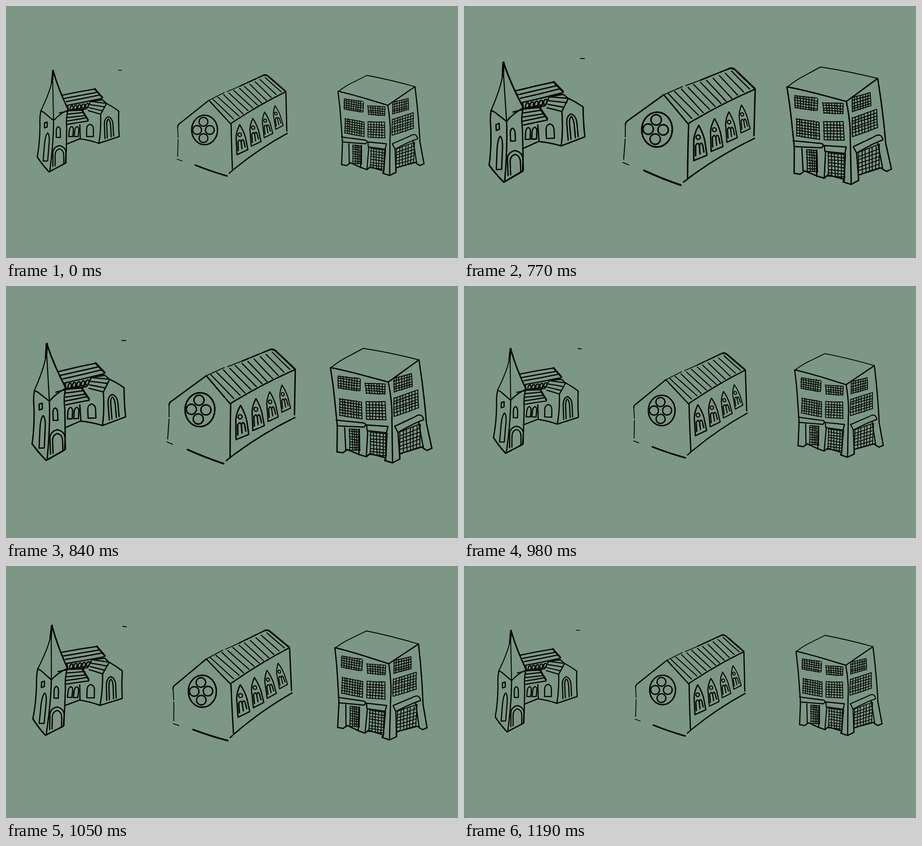
These frames come from a looping animation (998x556 px, 7140 ms). An HTML page:

```html
<!DOCTYPE html>
<html lang="en">
<head>
<meta charset="utf-8">
<title>Three sketched buildings</title>
<style>
html, body { margin: 0; width: 100%; height: 100%; overflow: hidden; background: #2c352f; }
svg { display: block; width: 998px; height: 556px; background: #7c9785; border-radius: 3px; }
path { fill: none; stroke: #000; stroke-linecap: round; stroke-linejoin: round; }
</style>
</head>
<body>
<svg viewBox="0 0 998 556"></svg>
<script>
const LOOP = 7140, START = 700, STEP = 70, STEPS = 7;
const { cos, sin, PI, exp, abs, floor, round } = Math;
const svg = document.querySelector('svg');

function add(parent, tag, attrs = {}) {
  const el = document.createElementNS(svg.namespaceURI, tag);
  for (const key in attrs) el.setAttribute(key, attrs[key]);
  parent.append(el);
  return el;
}
const building = (x, y, turn) => ({ x, y, turn, el: add(svg, 'g') });
const church = building(164, 260, -13.5);
const chapel = building(502, 258, 15.5);
const office = building(827, 262, -10.5);

let seed = 7;
function jitter(size) {
  seed = seed * 16807 % 2147483647;
  return (seed / 2147483647 * 2 - 1) * size;
}
const mix = (a, b, t) => a.map((v, i) => v + (b[i] - v) * t);
const shake = (p, size) => p.map(v => (v + jitter(size)).toFixed(1));

const pen = ({ el }, width, ...strokes) =>
  add(el, 'path', { d: strokes.join(''), 'stroke-width': width });

// Evenly spaced hand-drawn lines, from the edge a-b across to the edge c-d.
function ruled(target, width, count, a, b, c, d, wobble = .8) {
  for (let i = 0; i <= count; i++) {
    const from = mix(a, b, i / count), to = mix(c, d, i / count);
    pen(target, width, `M${shake(from, wobble)}Q${shake(mix(from, to, .5), wobble)} ${shake(to, wobble)}`);
  }
}

// Pointed opening: x is the middle of the base, y its level.
function arch(target, x, y, w, h, { lean = 0, slope = 0, open = false } = {}) {
  const side = s => `${x + s * w / 2 + lean * .6} ${y - h * .6}`;
  const shoulder = s => `${x + s * w / 2 + lean} ${y - h * .92}`;
  const foot = s => `${x + s * w / 2} ${y + s * slope * w / 2}`;
  pen(target, 2.4, `M${foot(-1)}L${side(-1)}Q${shoulder(-1)} ${x + lean} ${y - h}`,
    `Q${shoulder(1)} ${side(1)}L${foot(1)}`, open ? '' : 'Z');
}

function oval(target, width, x, y, rx, ry = rx) {
  pen(target, width, `M${x - rx} ${y}a${rx} ${ry} 0 1 1 ${2 * rx} 0a${rx} ${ry} 0 1 1 ${-2 * rx} 0`);
}

function glazing(x, y, w, h, slope, cell) {
  const corners = [[x, y], [x + w, y + slope * w], [x, y + h], [x + w, y + h + slope * w]];
  const [a, b, c, d] = corners.map(p => shake(p, 1).map(Number));
  ruled(office, 1.7, round(w / cell), a, b, c, d, 1);
  ruled(office, 1.7, round(h / cell), a, c, b, d, 1);
}

// Church: spire and tower
pen(church, 4.4, 'M104 143L101.500 168');
pen(church, 2, 'M101 168Q96 192 77 231', 'M103 162L105 253');
pen(church, 3, 'M105 146Q116 184 137 228', 'M69 333Q80 350 95 366L131 347');
pen(church, 2.5, 'M77 231L84 235L105 253Q116 240 137 229', 'M118 236L136 232',
  'M77 231Q74 245 75 262Q75 300 69 333', 'M105 253Q105 300 97 362',
  'M137 230Q132 245 134 270L133 320L131 347', 'M85 258L91 256V267L85 269Z');
arch(church, 87, 342, 10, 62, { lean: 5 });
arch(church, 115.5, 290, 9, 24);
for (const size of [1, .66])
  arch(church, 118, 350, 29 * size, 42 * (size + 1) / 2, { slope: -.3, open: true });

// Church: roofs, nave and wing
ruled(church, 2.5, 3, [125, 196], [136, 219], [197, 183], [212, 204]);
ruled(church, 2.4, 4, [137, 231], [134, 262], [170, 229], [181, 253]);
ruled(church, 2.3, 3, [188, 211], [181, 231], [222, 215], [209, 239]);
pen(church, 3.6, 'M196 183L213 202', 'M169 232L181 251');
pen(church, 2.5, 'M136 219L138 231L178 227L187 210L213 207L222 215Q234 221 249 232Q248 262 250 288L205 303',
  'M222 215L209 239Q210 275 205 303Q185 296 163 293L133 305', 'M163 262L164 293');
for (let i = 0; i < 5; i++) arch(church, 144 + 8.5 * i, 229 - 1.3 * i, 6, 9, { lean: 2 });
for (const x of [143, 155]) arch(church, x, 288, 9, 22, { lean: 2 });
arch(church, 185.5, 288, 15, 27);
for (const size of [1, .45])
  arch(church, 228, 290, 19 * size, 46 * (size + 4) / 5, { lean: -2, slope: -.3, open: true });
pen(church, 1.7, 'M248 141.500L255.500 142');

// Chapel: walls and roof
pen(chapel, 1.7, 'M379 268L380 290', 'M380 294L379 332', 'M378 338L389 342', 'M448 208L482 191', 'M488 189L516 177');
pen(chapel, 2.6, 'M379 267Q379 262 384 259L448 208L496 260', 'M516 177L568 153',
  'M497 259Q555 220 618 189Q619 235 620 276', 'M493 369L501 362Q555 317 621 281', 'M497 260Q498 315 500 362');
pen(chapel, 3.4, 'M418 351Q450 364 488 375', 'M568 153Q574 151 579 155L617 188');
ruled(chapel, 2.1, 10, [457, 206], [573, 157], [503, 249], [607, 190]);

// Chapel: rose window
oval(chapel, 3, 438.5, 273.5, 28.5, 32.5);
for (let i = 0; i < 4; i++)
  oval(chapel, 2.7, 436 + 14 * cos(i * PI / 2), 273.5 + 18 * sin(i * PI / 2), 9.7);

// Chapel: lancets shrink and lean with distance
const lancet = 'M-6 66L-8 27Q-7 13 0 0Q9 14 13 29L18 55Z' +
  'M-3 57L-4 38Q0 30 3 37L5 53M3 38Q6 29 9 36L12 49';
for (let i = 0; i < 4; i++) {
  const x = 516 + 30.5 * i - 1.5 * i * i, y = 262 - 14 * i;
  const window = { el: add(chapel.el, 'g', {
    transform: `matrix(${1 - .09 * i} 0 ${.03 * i} ${1 - .07 * i} ${x} ${y})`
  }) };
  pen(window, 2.7, lancet);
  oval(window, 2.4, 0, 22, 4);
}

// Office: walls, canopies and pillars
pen(office, 1.8, 'M733 189Q750 176 765 169L797 153Q850 163 903 178');
pen(office, 2.5, 'M733 188Q755 193 790 203L843 219L903 178',
  'M733 189Q738 225 740 260L743 300L741 350', 'M843 219Q850 260 848 290L847 373',
  'M903 178Q911 240 914 300L923 348');
pen(office, 2.3, 'M741 289L794 296Q800 298 794 304L742 300',
  'M799 300L840 304L837 316L800 311Z', 'M853 304L892 287Q906 278 909 293Q890 299 859 316Z',
  'M757 304L758 348', 'M784 308L783 357', 'M801 312L797 360', 'M838 317L834 367',
  'M859 317L861 367', 'M899 298L907 348');
pen(office, 2.6, 'M741 350L752 352L761 346L783 356L797 361L804 355L834 364L832 369L847 374L861 367V357L904 345L907 348L914 352L923 348');

// Office: two storeys of windows above the shop fronts
for (let row = 0; row < 2; row++) {
  const cell = 5 + row * .6;
  glazing(746 + 3 * row, 204 + 45 * row, 42, 24 + 8 * row, .15, cell);
  glazing(800, 220 + 35 * row, 36, 20 + 14 * row, .07, cell);
  glazing(853, 214 + 36 * row, 35 + 12 * row, 25 + 9 * row, -.28, cell);
}
glazing(766, 306, 18, 40, .15, 5);
glazing(806, 315, 30, 43, .1, 6.5);
glazing(863, 315, 38, 42, -.33, 6.5);

// A big swing one way, then a smaller one back, held for each step.
const bump = x => exp(-x * x / 1.1);
function swing(time) {
  const k = floor((time - START) / STEP) + 1;
  return k < 1 || k > STEPS ? 0 : .21 * bump(k - 2.4) - .085 * bump(k - 6);
}

function render() {
  const s = swing(performance.now() % LOOP);
  for (const { el, x, y, turn } of [church, chapel, office])
    el.setAttribute('transform',
      `translate(${x} ${y}) rotate(${turn * s}) scale(${1 + abs(s)}) translate(${-x} ${-y})`);
  requestAnimationFrame(render);
}
render();
</script>
</body>
</html>
```
